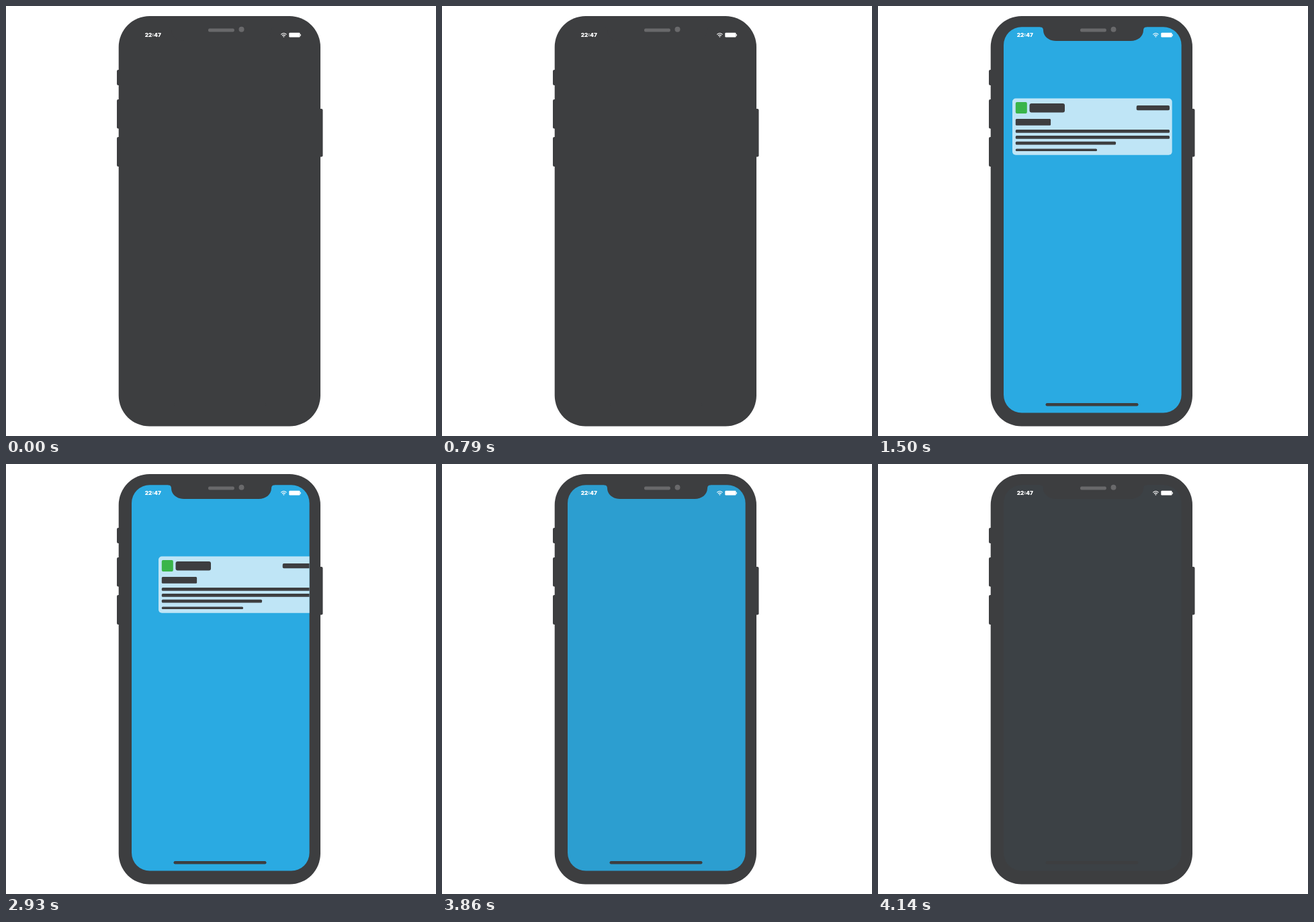
An HTML page for the animation above (4.78 s loop, 640 by 640 pixels).

```html
<!DOCTYPE html>
<html lang="en">
<head>
<meta charset="utf-8">
<title>Phone notification</title>
<style>
  html, body { margin: 0; width: 100%; height: 100%; overflow: hidden; background: #fff; }
  svg { display: block; width: 100%; height: 100%; }
  .dark { fill: #3d3e40; }
  .grey { fill: #69696b; }
  .white { fill: #fff; }
  .wifi { fill: none; stroke: #fff; stroke-width: 1.1; stroke-linecap: round; }
  text { font: 900 8.2px Inter, "Open Sans", sans-serif; fill: #fff; }
</style>
</head>
<body>
<svg viewBox="0 0 640 640">
  <defs>
    <clipPath id="glass"><rect x="187" y="31.2" width="264.6" height="574.4" rx="27"/></clipPath>
  </defs>
  <g id="phone">
    <g class="dark">
      <rect x="165" y="95" width="8" height="23" rx="2"/>
      <rect x="165" y="139" width="8" height="43.5" rx="2"/>
      <rect x="165" y="195" width="8" height="44" rx="2"/>
      <rect x="462" y="153" width="9.5" height="71.5" rx="2"/>
      <rect x="167.7" y="15" width="300.3" height="610.6" rx="46"/>
    </g>
    <g clip-path="url(#glass)">
      <rect id="screen" x="187" y="31" width="265" height="575" fill="#2aaae2"/>
      <g id="card">
        <rect x="200" y="137.5" width="237.7" height="84.2" rx="5" class="white" opacity=".7"/>
        <rect x="204.8" y="143" width="17" height="17" rx="2" fill="#39b54a"/>
        <g class="dark">
          <rect x="225.5" y="145" width="52.5" height="13.5" rx="3"/>
          <rect x="384.7" y="148" width="49.3" height="7.2" rx="2"/>
          <rect x="204.8" y="168" width="52.3" height="9.8" rx="1.5"/>
          <rect x="204.8" y="184" width="229.2" height="4.8" rx="1.5"/>
          <rect x="204.8" y="193" width="229.2" height="4.8" rx="1.5"/>
          <rect x="204.8" y="201.7" width="149.2" height="4.8" rx="1.5"/>
          <rect x="204.8" y="212.6" width="121.2" height="3.5" rx="1.5"/>
        </g>
      </g>
    </g>
    <path class="dark" d="M241 30V31.2Q246 31.4 246 36C246 45 254 52 265 52H376C387 52 395 45 395 36Q395 31.4 400 31.2V30Z"/>
    <rect class="dark" x="249.5" y="591" width="138" height="4.4" rx="2.2"/>
    <rect class="grey" x="301" y="33.6" width="38.8" height="4.8" rx="2"/>
    <circle class="grey" cx="350.5" cy="34.8" r="4"/>
    <text x="206.7" y="46.3">22:47</text>
    <path class="wifi" d="M409.6 42.2Q413.4 38.8 417.2 42.2M411.3 44Q413.4 42.2 415.5 44"/>
    <circle class="white" cx="413.4" cy="45.6" r=".9"/>
    <rect class="white" x="421.3" y="39.8" width="16.3" height="6.8" rx="1.4"/>
    <rect class="white" x="437.8" y="42" width="1.2" height="2.4" rx=".5"/>
  </g>
</svg>
<script>
  const LOOP = 4780, FPS = 14;
  const RATE = 0.215; // fade speed per tick
  const TILT = [0.6, 1, 0, -0.75, 0, 1, 0.3, -0.6, -1]; // degrees, from tick 2
  const [phone, screen, card] = ["phone", "screen", "card"].map(id => document.getElementById(id));
  const clamp = v => Math.min(1, Math.max(0, v));

  function draw(ms) {
    // The motion advances in hard ticks, rounded to centiseconds.
    const n = Math.floor((ms % LOOP + 5) * FPS / 1000);

    phone.setAttribute("transform", `rotate(${TILT[n - 2] || 0} 318 320)`);

    const fadeIn = clamp((n - 14.02) * RATE);
    const fadeOut = clamp(0.89 - (Math.min(n, 58) - 54) * RATE);
    screen.setAttribute("opacity", n < 54 ? fadeIn : fadeOut);

    const rise = Math.max(0, 21 - n) * 45.5;
    const swipe = n < 41 ? 0 : 27 + (n - 41) * 60;
    card.setAttribute("transform", `translate(${swipe} ${rise})`);
    card.setAttribute("opacity", n < 45 ? clamp((n - 16.2) * RATE) : 0);
  }

  const start = performance.now();
  function loop() {
    draw(performance.now() - start);
    requestAnimationFrame(loop);
  }
  loop();
</script>
</body>
</html>
```
